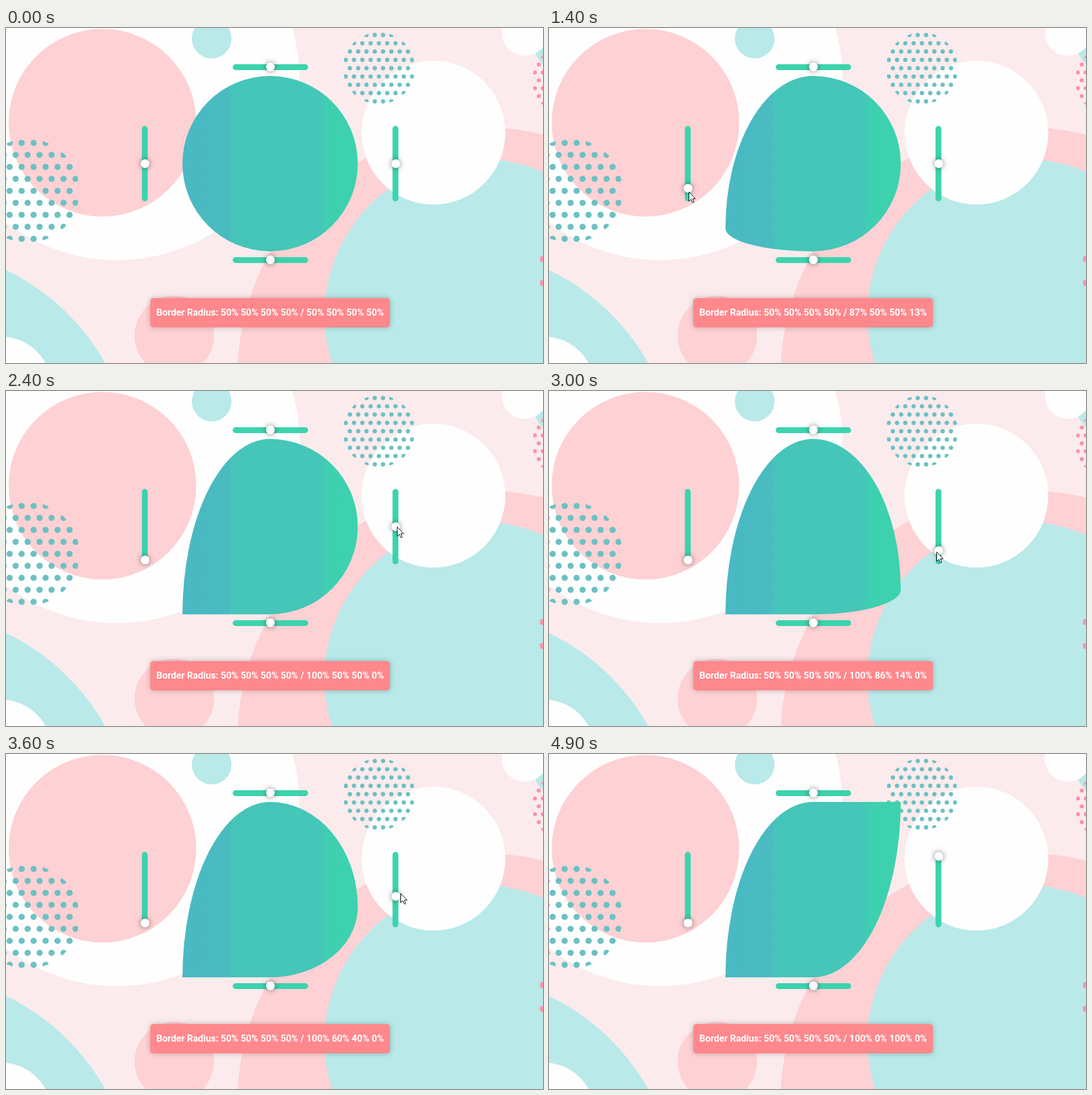
An HTML page with a canvas for the animation above (5.8 s loop, 919 by 573 pixels).

```html
<!DOCTYPE html>
<html lang="en">
<head>
<meta charset="utf-8">
<title>Border radius sliders</title>
<style>
  html, body { margin: 0; width: 100%; height: 100%; overflow: hidden; background: #fcebec; }
  canvas { position: absolute; left: 0; top: 0; }
  .row {
    position: absolute; left: 0; top: 462px; width: 904px;
    display: flex; justify-content: center;
  }
  #label {
    padding: 0 10px; height: 50px; border-radius: 5px;
    background: #ff888c; color: #fff; white-space: nowrap;
    font: 700 16px/49px Roboto, sans-serif;
    box-shadow: 0 0 10px rgba(0, 0, 0, .25);
  }
</style>
</head>
<body>
<canvas id="stage" width="919" height="573"></canvas>
<div class="row"><div id="label"></div></div>
<script>
const ctx = document.getElementById('stage').getContext('2d');
const label = document.getElementById('label');

const LOOP = 5800, STEP = 100;
const WHITE = '#fefefe', PINK = '#fed1d4', AQUA = '#b9e9e9';
const TEAL = '#6cc1c3', ROSE = '#fc93ad', GREEN = '#3cd3ad';
const BOX = { x: 302, y: 82, size: 300 };

// Pointer tip and the two slider values; each move eases some of them
const initial = { x: 29, y: 0, left: 50, right: 50 };
const moves = [
  { from: 0, to: 500, set: { x: 266, y: 247 } },
  { from: 500, to: 800, set: { x: 241, y: 235 } },
  { from: 800, to: 1200, set: { y: 274, left: 82 } },
  { from: 1300, to: 1600, set: { x: 235, y: 296, left: 100 } },
  { from: 1600, to: 1980, set: { x: 679, y: 306 } },
  { from: 1980, to: 2400, set: { x: 669, y: 232 } },
  { from: 2600, to: 3220, set: { x: 661, y: 293, right: 100 } },
  { from: 3220, to: 3600, set: { x: 675, y: 238, right: 60 } },
  { from: 3700, to: 4100, set: { y: 187, right: 14 } },
  { from: 4100, to: 4200, set: { x: 671, y: 165, right: 0 } },
  { from: 4200, to: 4700, set: { x: 600, y: 77 } }
];

const ease = p => p * p * (3 - 2 * p);

function stateAt(t) {
  const s = { ...initial };
  for (const { from, to, set } of moves) {
    const p = ease(Math.min(1, Math.max(0, (t - from) / (to - from))));
    for (const key in set) s[key] += (set[key] - s[key]) * p;
  }
  for (const key in s) s[key] = Math.round(s[key]);
  return s;
}

function disc(x, y, r, color) {
  ctx.fillStyle = color;
  ctx.beginPath();
  ctx.arc(x, y, r, 0, Math.PI * 2);
  ctx.fill();
}

// Staggered dots clipped to a circle
function dots(cx, cy, gap, color) {
  ctx.save();
  ctx.beginPath();
  ctx.arc(cx, cy, gap * 4.33, 0, Math.PI * 2);
  ctx.clip();
  for (let row = -4; row <= 4; row++) {
    for (let col = row % 2 ? -4 : -3.5; col <= 4; col++) {
      disc(cx + col * gap, cy + row * gap, gap * 0.26, color);
    }
  }
  ctx.restore();
}

function drawBackdrop() {
  ctx.fillStyle = '#fcebec';
  ctx.fillRect(0, 0, 919, 573);
  disc(190, 85, 312, WHITE);
  disc(165, 162, 160.5, PINK);
  disc(352, 18, 34, AQUA);
  disc(-167, 762, 386, AQUA);
  disc(-8, 614, 86, WHITE);
  disc(288, 526, 68, PINK);
  disc(819, 593, 422.7, PINK);
  disc(812, 491, 267, AQUA);
  disc(731.5, 179, 123, WHITE);
  disc(960, 20, 59, AQUA);
  disc(888, 8, 39.5, WHITE);
  dots(37, 278.5, 20.5, TEAL);
  dots(638.2, 68.7, 14.2, TEAL);
  dots(959, 89.5, 13.5, ROSE);
  dots(1000, 415.5, 20.5, ROSE);
}

// Three tonal bands from blue to green
const fill = ctx.createLinearGradient(BOX.x, 0, BOX.x + BOX.size, 0);
[[0, '#4ab9c3'], [.275, '#49bcc0'], [.275, '#45c5b9'],
 [.8, '#44c7b8'], [.8, '#3fceb1'], [1, GREEN]].forEach(s => fill.addColorStop(...s));

function drawShape(left, right) {
  const { x, y, size } = BOX, rx = size / 2, cx = x + rx, q = Math.PI / 2;
  const l = size * left / 100, r = size * right / 100;
  ctx.fillStyle = fill;
  ctx.beginPath();
  ctx.ellipse(cx, y + l, rx, l, 0, 2 * q, 3 * q);
  ctx.ellipse(cx, y + r, rx, r, 0, 3 * q, 4 * q);
  ctx.ellipse(cx, y + r, rx, size - r, 0, 0, q);
  ctx.ellipse(cx, y + l, rx, size - l, 0, q, 2 * q);
  ctx.fill();
}

function drawSlider(cx, cy, vertical, value) {
  const w = vertical ? 10 : 129, h = vertical ? 129 : 10;
  const move = (value - 50) * 1.14;
  ctx.fillStyle = GREEN;
  ctx.beginPath();
  ctx.roundRect(cx - w / 2, cy - h / 2, w, h, 5);
  ctx.fill();
  ctx.save();
  ctx.shadowColor = 'rgba(0, 0, 0, .5)';
  ctx.shadowBlur = 10;
  disc(vertical ? cx + .5 : cx + move, vertical ? cy + move : cy - .5, 7.5, '#fff');
  ctx.restore();
}

const arrow = new Path2D('M0 0V16L3.6 12.5L6 18H8L8.4 17L6.3 11.5H11Z');

function drawPointer(x, y) {
  ctx.save();
  ctx.translate(x + .5, y + .5);
  ctx.fillStyle = '#fff';
  ctx.strokeStyle = '#000';
  ctx.lineJoin = 'round';
  ctx.fill(arrow);
  ctx.stroke(arrow);
  ctx.restore();
}

function render(t) {
  const { x, y, left, right } = stateAt(t);
  drawBackdrop();
  drawShape(left, right);
  drawSlider(452.5, 67, false, 50);
  drawSlider(452.5, 397, false, 50);
  drawSlider(237.5, 232, true, left);
  drawSlider(666.5, 232, true, right);
  if (t >= 100 && t < 4900) drawPointer(x, y);
  const radii = [left, right, 100 - right, 100 - left].map(v => v + '%').join(' ');
  label.textContent = 'Border Radius: 50% 50% 50% 50% / ' + radii;
}

const start = performance.now();
let last = -1;

function tick() {
  const t = (performance.now() - start) % LOOP;
  const step = Math.floor(t / STEP) * STEP;
  if (step !== last) render(last = step);
  requestAnimationFrame(tick);
}
tick();
</script>
</body>
</html>
```
